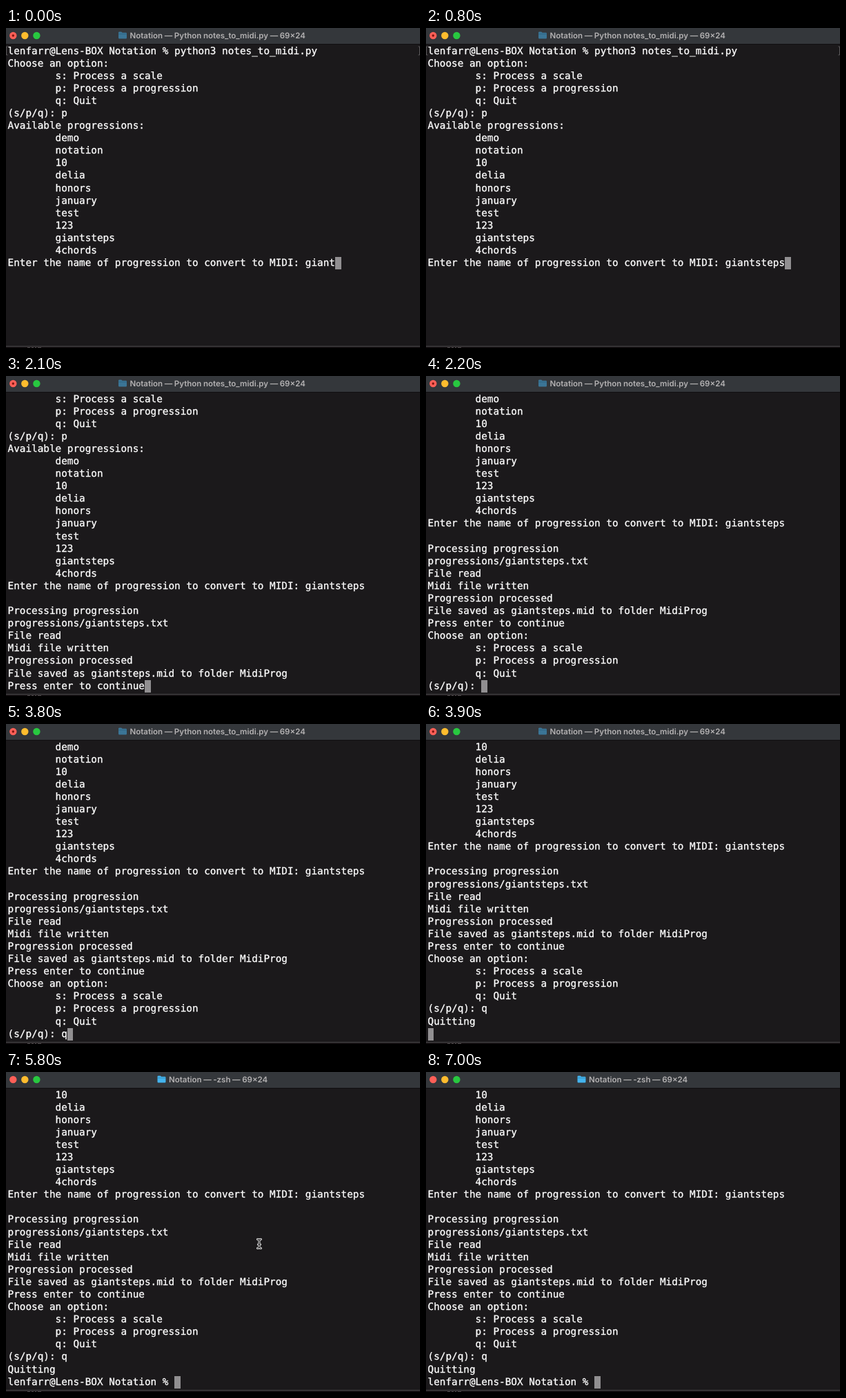
These frames come from a looping animation (600x464 px, 7.1 s). An HTML page:

```html
<!DOCTYPE html>
<html lang="en">
<head>
<meta charset="utf-8">
<title>Terminal session</title>
<style>
  html, body { margin: 0; width: 100%; height: 100%; overflow: hidden; background: #1b191b; }
  #stage { position: relative; width: 600px; height: 464px; overflow: hidden; }
  svg { position: absolute; left: 0; top: 0; }
  #title {
    font: 600 11.5px Inter, sans-serif; word-spacing: -.3px;
    fill: #b4b2b3; text-rendering: geometricPrecision;
  }
  pre {
    position: absolute; left: 2.5px; top: 24.5px; margin: 0; color: #fff;
    font: 14.33px/18.1px "DejaVu Sans Mono", monospace; -webkit-text-stroke: .3px #fff;
    text-rendering: geometricPrecision; font-variant-ligatures: none;
  }
  #caret { display: inline-block; width: 1ch; height: 18px; vertical-align: top; background: #918f91; }
</style>
</head>
<body>
<div id="stage">
  <svg width="600" height="464">
    <rect width="600" height="23" fill="#34373b"/>
    <rect y="23" width="600" height="1" fill="#100e10"/>
    <rect y="461" width="600" height="1" fill="#4b494b"/>
    <rect y="462" width="600" height="2" fill="#171315"/>
    <path d="M31 463.5h4m2 0h3m2 0h2m2 0h5" stroke="#5a5658"/>
    <circle cx="10.3" cy="11" r="5.2" fill="#ff5f57"/>
    <circle id="busy" cx="10.3" cy="11" r="1.7" fill="#7c1510"/>
    <circle cx="27.3" cy="11" r="5.2" fill="#febc2e"/>
    <circle cx="44.4" cy="11" r="5.2" fill="#28c840"/>
    <g id="folder">
      <path d="M0 1.2q0-1.2 1.2-1.2h3l1.4 1.3h5.2q1.2 0 1.2 1.2v6.3q0 1.2-1.2 1.2h-9.6q-1.2 0-1.2-1.2z"/>
      <path d="M0 3.2h12" stroke="#1c4a66" stroke-opacity=".5" stroke-width=".7"/>
    </g>
    <text id="title" y="15"></text>
    <path id="marks" d="M2.5 27h-2v12h2M597.5 27h2v12h-2" fill="none" stroke="#5c5a5c"/>
  </svg>
  <pre><span id="log"></span><span id="caret"></span></pre>
  <svg width="600" height="464">
    <defs>
      <path id="beam" d="M-2.5-6.5q2.5 0 2.5 2v9q0 2-2.5 2M2.5-6.5q-2.5 0-2.5 2v9q0 2 2.5 2M-1.5 1h3"/>
    </defs>
    <g id="pointer" fill="none" stroke-linecap="round">
      <use href="#beam" stroke="#f2f2f2" stroke-width="3"/>
      <use href="#beam" stroke="#151315" stroke-width="1.1"/>
    </g>
  </svg>
</div>
<script>
const LOOP = 7100, STEP = 100, ROWS = 24, QUIT = 4000;
const $ = id => document.getElementById(id);
const indent = words => words.map(w => " ".repeat(8) + w + "\n").join("");

const prompt = "lenfarr@Lens-BOX Notation % ";
const menu = "Choose an option:\n" +
  indent(["s: Process a scale", "p: Process a progression", "q: Quit"]) + "(s/p/q): ";
const names = ["demo", "notation", "10", "delia", "honors", "january", "test", "123", "giantsteps", "4chords"];

// Terminal output: [time in ms, appended text]
const output = [
  [0, prompt + "python3 notes_to_midi.py\n" + menu + "p\nAvailable progressions:\n" + indent(names) +
      "Enter the name of progression to convert to MIDI: giant"],
  ...[..."steps"].map((letter, i) => [100 + 150 * i, letter]),
  [1200, "\n\nProcessing progression\nprogressions/giantsteps.txt\nFile read\nMidi file written\n" +
         "Progression processed\nFile saved as giantsteps.mid to folder MidiProg\nPress enter to continue"],
  [2200, "\n" + menu],
  [3200, "q"],
  [3900, "\nQuitting\n"],
  [QUIT, prompt]
];

// Pointer positions, one per step, holding the last
const POINTER_IN = 4400, POINTER_OUT = 5900;
const path = [[468, 131], [458, 144], [438, 185], [411, 228], [367, 249]];

const show = (id, on) => $(id).setAttribute("visibility", on ? "visible" : "hidden");
const place = (id, x, y) => $(id).setAttribute("transform", `translate(${x} ${y})`);

function draw(now) {
  const t = Math.floor(now % LOOP / STEP) * STEP;
  const lines = output.filter(([at]) => at <= t).map(([, text]) => text).join("").split("\n");
  $("log").textContent = lines.slice(-ROWS).join("\n");
  show("marks", lines.length <= ROWS);

  const running = t < QUIT;
  const x = running ? 179.5 : 236;
  show("busy", running);
  $("title").textContent = `Notation — ${running ? "Python notes_to_midi.py" : "-zsh"} — 69×24`;
  $("title").setAttribute("x", x);
  $("folder").setAttribute("fill", running ? "#3b7596" : "#43b4ee");
  place("folder", x - 16.5, 5.5);

  show("pointer", t >= POINTER_IN && t < POINTER_OUT);
  const i = Math.min(Math.max((t - POINTER_IN) / STEP, 0), path.length - 1);
  place("pointer", ...path[i]);
}

const start = performance.now();
(function tick() {
  draw(performance.now() - start);
  requestAnimationFrame(tick);
})();
</script>
</body>
</html>
```
